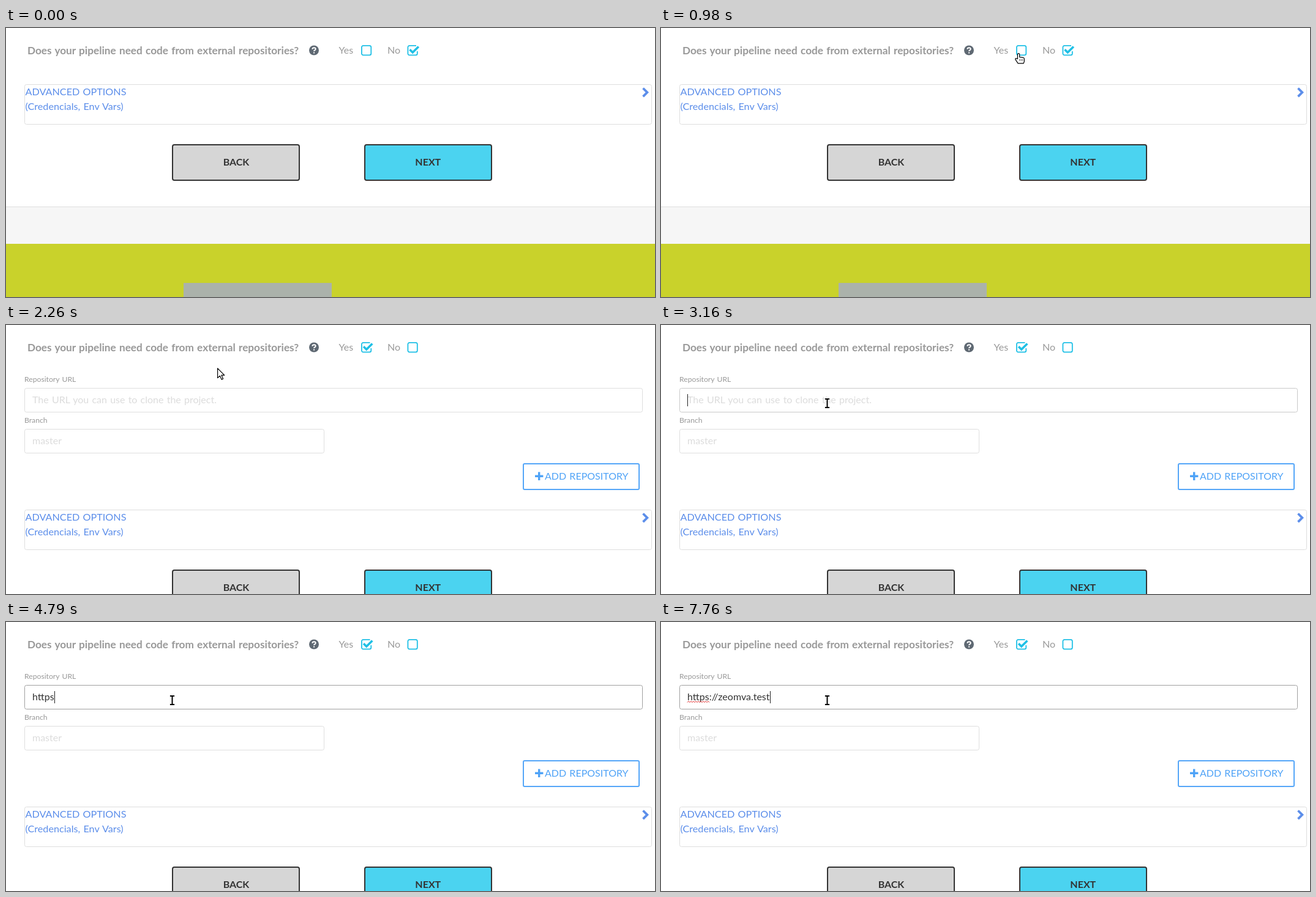
These frames come from a looping animation (1060x440 px, 8000 ms). An HTML page:

```html
<!DOCTYPE html>
<html lang="en">
<head>
<meta charset="utf-8">
<title>Pipeline form</title>
<style>
  html, body { margin: 0; width: 100%; height: 100%; overflow: hidden; background: #fff; }
  svg { display: block; width: 100%; height: 100%; }
  text { font: 16px Lato, "Open Sans", sans-serif; word-spacing: 1.1px; fill: #999; white-space: pre; }
  .title { font-size: 17.2px; font-weight: 700; }
  .label { font-size: 12.2px; }
  .hint { fill: #dcdcdc; }
  .link { font-size: 16.2px; fill: #5c8eea; }
  .button { font-weight: 700; fill: #333; text-anchor: middle; }
  .add { fill: #4fa3f7; }
  .typed { fill: #333; }
  .field { fill: #fff; stroke: #dedede; }
  .tick { fill: none; stroke: #1fc0e6; stroke-width: 1.8; }
  .mark { stroke-width: 3.6; }
  .pointer { fill: #fff; stroke: #000; stroke-width: 1.2; stroke-linejoin: round; }
</style>
</head>
<body>
<svg viewBox="0 0 1060 440">
  <defs>
    <rect id="empty" class="tick" x=".9" y=".9" width="15.4" height="15.4" rx="2.6"/>
    <g id="checked" class="tick">
      <path d="M14.5 .9H3.5a2.6 2.6 0 0 0-2.6 2.6v10.2a2.6 2.6 0 0 0 2.6 2.6h10.2a2.6 2.6 0 0 0 2.6-2.6V10"/>
      <path class="mark" d="M4 7.3l4.7 4.7 9.6-9.6"/>
    </g>
  </defs>

  <text class="title" x="35" y="43">Does your pipeline need code from external repositories?</text>
  <circle cx="503" cy="36.5" r="8" fill="#5f6973"/>
  <path d="M500.4 34.6q.2-2.4 2.7-2.4t2.6 2.1q0 1.3-1.4 2.1-1.2.6-1.2 1.7M503.1 39.4v2" fill="none" stroke="#fff" stroke-width="2"/>
  <text x="543.5" y="42">Yes</text>
  <text x="623" y="42">No</text>
  <g transform="translate(580 28)"><use id="yesOff" href="#empty"/><use id="yesOn" href="#checked"/></g>
  <g transform="translate(655.5 28)"><use id="noOff" href="#empty"/><use id="noOn" href="#checked"/></g>

  <g id="form">
    <text class="label" x="30" y="93">Repository URL</text>
    <rect id="urlField" class="field" x="30.5" y="103.5" width="1009" height="39" rx="3"/>
    <text id="hint" class="hint" x="43" y="128">The URL you can use to clone the project.</text>
    <text id="typed" class="typed" x="43" y="128"></text>
    <path id="squiggle" fill="none" stroke="#d22"/>
    <rect id="caret" y="113" width="1" height="20" fill="#222"/>
    <text class="label" x="30" y="160">Branch</text>
    <rect class="field" x="30.5" y="170.5" width="489" height="39" rx="3"/>
    <text class="hint" x="43" y="195">master</text>
    <rect x="845" y="227" width="189" height="42" rx="2" fill="#fff" stroke="#55a6f8" stroke-width="2"/>
    <path d="M864 247.2h13.4M870.7 240.5v13.4" stroke="#4fa3f7" stroke-width="3.4"/>
    <text class="add" x="880" y="253">ADD REPOSITORY</text>
  </g>

  <g id="lower">
    <rect class="field" x="30.5" y="92.5" width="1024" height="65" rx="3"/>
    <text class="link" x="31.5" y="110">ADVANCED OPTIONS</text>
    <text class="link" x="31.5" y="134">(Credencials, Env Vars)</text>
    <path d="M1040.5 98.5l6.8 6.8-6.8 6.8" fill="none" stroke="#5c8eea" stroke-width="3.8"/>
    <rect x="272" y="191" width="207" height="58" rx="3" fill="#d6d6d6" stroke="#333" stroke-width="2"/>
    <text class="button" x="376" y="225">BACK</text>
    <rect x="586" y="191" width="207" height="58" rx="3" fill="#4bd3f0" stroke="#333" stroke-width="2"/>
    <text class="button" x="689.3" y="225">NEXT</text>
    <rect y="292" width="1060" height="61" fill="#f6f6f6"/>
    <rect y="292" width="1060" height="1" fill="#dedede"/>
    <rect y="353" width="1060" height="300" fill="#c9d22b"/>
    <rect x="290" y="417" width="242" height="242" fill="#abb2ab"/>
  </g>

  <g id="cursor">
    <path id="arrow" class="pointer" d="M.6 .8v15.8l3.7-3.5 2.8 6 2.5-1.1-2.7-5.9h4.9z"/>
    <g id="hand" class="pointer">
      <path d="M-1.6 9.5V2.2a1.6 1.6 0 0 1 3.2 0v4.4l5.8.7q2 .4 2 2.4v3.6l-1.2 3.6H-.9l-4-6q-1-2.2 1-2.2z"/>
      <path d="M1.8 10v2.6m2.5-2.6v2.6m2.5-2.6v2.6" stroke-width=".8"/>
    </g>
    <g id="beam" fill="none">
      <path d="M-4.3-7h8.6M-4.3 7h8.6M0-7v14" stroke="#fff" stroke-width="4"/>
      <path d="M-3.6-7h7.2M-3.6 7h7.2M0-7v14" stroke="#000" stroke-width="2"/>
    </g>
  </g>
</svg>
<script>
  const LOOP = 8000;
  const $ = id => document.getElementById(id);
  const clamp = v => Math.min(1, Math.max(0, v));
  const show = (id, on) => { $(id).style.display = on ? "" : "none"; };
  const fade = (id, amount) => { $(id).style.opacity = amount; };

  const address = "https://zeomva.test";
  const keyTimes = [4365, 4440, 4600, 4695, 4790, 5140, 5420, 5485, 5880, 6150,
                    6300, 6430, 6650, 6840, 7010, 7120, 7410, 7530, 7760];

  // Pointer waypoints: time, x, y
  const toCheckbox = { start: 500, step: 43.6, points: [
    [500, 403, 1], [590, 490, 18], [680, 555, 33], [780, 588, 43], [850, 592, 44], [979, 584, 41]] };
  const toField = { start: 2170, step: 45, points: [
    [2125, 584, 41], [2170, 535, 45], [2260, 345, 70], [2350, 295, 94], [2440, 277, 114], [2575, 271.5, 128]] };

  function pointerAt(time) {
    const { start, step, points } = time < toField.start ? toCheckbox : toField;
    const t = start + Math.floor((time - start) / step) * step;
    const next = points.findIndex(p => p[0] > t);
    if (next < 0) return points[points.length - 1].slice(1);
    if (next === 0) return points[0].slice(1);
    const [a, b] = [points[next - 1], points[next]];
    const k = (t - a[0]) / (b[0] - a[0]);
    return [1, 2].map(i => Math.round(a[i] + (b[i] - a[i]) * k));
  }

  function drawPointer(t) {
    const [x, y] = pointerAt(t);
    const kind = y >= 103 ? "beam" : x > 575 ? "hand" : "arrow";
    show("cursor", t >= 500);
    for (const id of ["arrow", "hand", "beam"]) show(id, id === kind);
    $("cursor").setAttribute("transform", `translate(${x} ${y})`);
  }

  function drawField(t) {
    const focus = t < 3160 ? 0 : clamp((Math.floor((t - 3160) / 90) + 1) / 3);
    const shade = Math.round(222 - 62 * focus);
    $("urlField").style.stroke = `rgb(${shade},${shade},${shade})`;

    const text = address.slice(0, keyTimes.filter(k => k <= t).length);
    const typed = $("typed");
    if (typed.textContent !== text) typed.textContent = text;
    show("hint", !text);
    show("squiggle", t >= 5550);
    show("caret", (t >= 3160 && t < 3690) || t >= 4290);
    const width = text ? typed.getComputedTextLength() : 0;
    $("caret").setAttribute("x", Math.round(43 + width));
  }

  function render(t) {
    const open = t >= 1530;
    show("form", open);
    $("lower").setAttribute("transform", `translate(0 ${open ? 210 : 0})`);
    const yes = clamp(Math.floor((t - 1530) / 45) / 6);
    fade("yesOn", yes);
    fade("noOff", yes);
    fade("yesOff", 1 - yes);
    fade("noOn", 1 - yes);
    drawField(t);
    drawPointer(t);
  }

  $("squiggle").setAttribute("d", "M43 131.5" + "l2-2 2 2".repeat(9));
  const origin = performance.now();
  function tick() {
    render((performance.now() - origin) % LOOP);
    requestAnimationFrame(tick);
  }
  tick();
</script>
</body>
</html>
```
